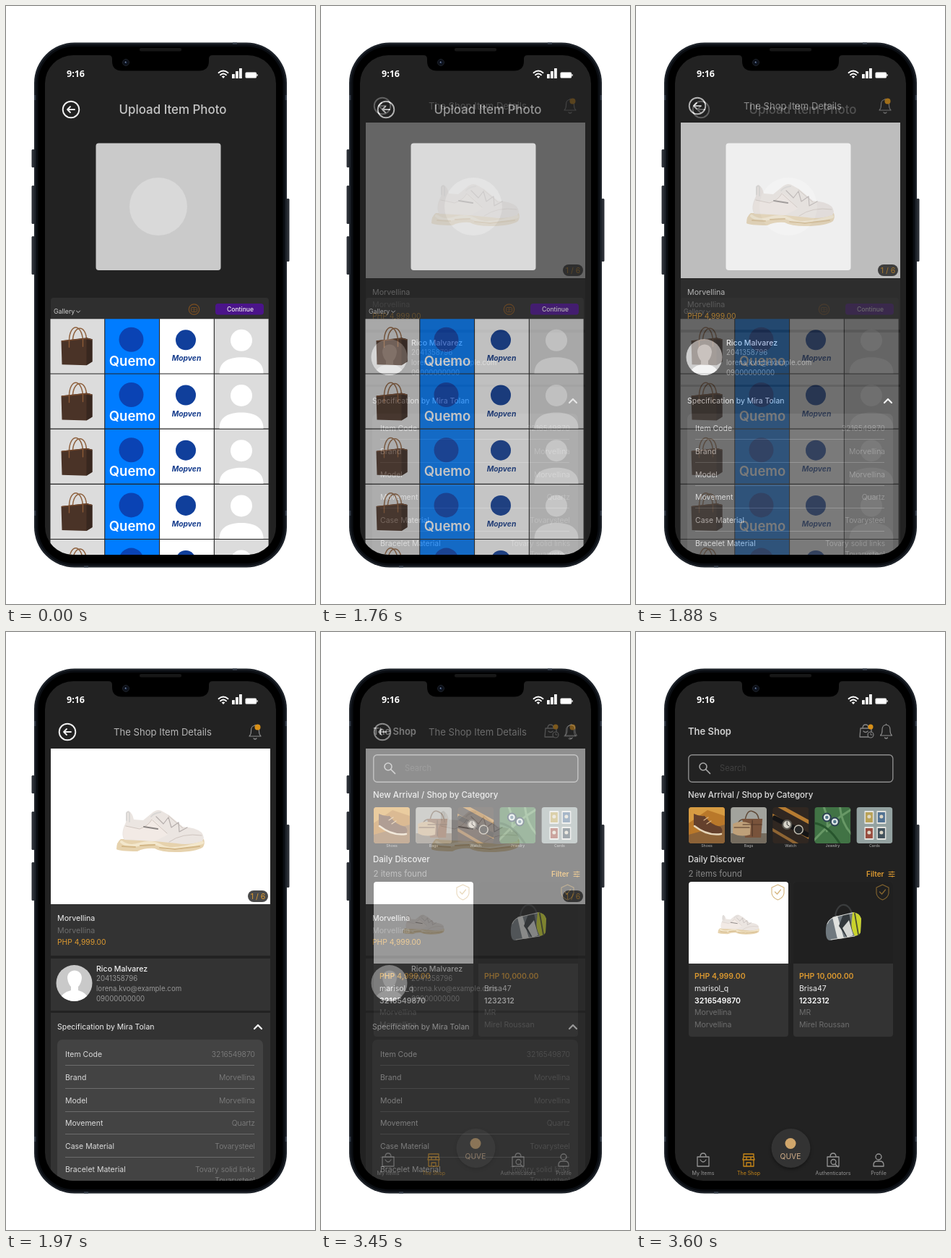
Write an HTML page with a canvas that moves like this. It is 428x826 px and loops after 5.27 s.

```html
<!DOCTYPE html>
<html lang="en">
<head>
<meta charset="utf-8">
<title>Shop app walkthrough</title>
<style>
html, body { margin: 0; width: 100%; height: 100%; overflow: hidden; background: #fff; }
canvas { display: block; width: 428px; height: 826px; }
</style>
</head>
<body>
<canvas id="stage" width="428" height="826"></canvas>
<script>
const W = 428, H = 826, LOOP = 5270, STEP = 30, STEPS = 10;
const BG = '#222222', PANEL = '#333333', GOLD = '#dd9a30', PALE = '#dedede', DIM = '#6e6e6e';
const stage = document.getElementById('stage').getContext('2d');
let g = stage;

function box(x, y, w, h, r, fill, stroke, width = 1) {
  g.beginPath();
  g.roundRect(x, y, w, h, r);
  paint(fill, stroke, width);
}
function disc(x, y, r, fill, stroke, width = 1) {
  g.beginPath();
  g.arc(x, y, r, 0, Math.PI * 2);
  paint(fill, stroke, width);
}
function paint(fill, stroke, width) {
  if (fill) { g.fillStyle = fill; g.fill(); }
  if (stroke) { g.strokeStyle = stroke; g.lineWidth = width; g.stroke(); }
}
function shape(d, fill) {
  g.fillStyle = fill;
  g.fill(new Path2D(d));
}
function line(d, color, width = 1) {
  g.strokeStyle = color;
  g.lineWidth = width;
  g.lineCap = g.lineJoin = 'round';
  g.stroke(new Path2D(d));
}
function text(s, x, y, size, color, weight = 400, align = 'left', family = 'Inter') {
  g.font = `${weight} ${size}px "${family}", sans-serif`;
  g.textAlign = align;
  g.fillStyle = color;
  g.fillText(s, x, y);
}
function at(x, y, scale, draw) {
  g.save();
  g.translate(x, y);
  g.scale(scale, scale);
  draw();
  g.restore();
}
function clipped(x, y, w, h, r, draw) {
  g.save();
  g.beginPath();
  g.roundRect(x, y, w, h, r);
  g.clip();
  draw();
  g.restore();
}

function backButton(x, y) {
  disc(x, y, 11.3, null, '#f2f2f2', 1.9);
  line(`M${x + 5} ${y}h-10m4 -4l-4 4l4 4`, '#f2f2f2', 1.8);
}
function bell(x, y, dot) {
  line(`M${x - 8} ${y + 6}h16c-3 -3 -2.5 -5 -2.5 -8c0 -9 -11 -9 -11 0c0 3 .5 5 -2.5 8zM${x - 2} ${y + 9}q2 2 4 0M${x} ${y - 9}v-1`, '#8c8c8c', 1.2);
  if (dot) disc(x + 3.5, y - 6.5, 4, '#d89018');
}

// Sneaker, 123 units wide
function shoe() {
  shape('M7 43Q1 47 1 57Q5 60 30 60Q40 55 54 56Q62 61 83 61Q111 61 121 54Q124 49 122 43Z', '#e6d2ad');
  shape('M14 20Q14 3 18 4Q23 7 25 16L38 17L49 8Q58 0 65 5L74 10L93 26Q111 27 119 34Q124 41 120 46Q101 52 85 49L54 46L12 44Q6 36 14 20Z', '#ebe5e1');
  shape('M13 25L30 28Q44 26 50 15L58 20L72 37L54 46L12 43Q8 35 13 25Z', '#f2eae5');
  line('M19 19V7q-2 -3 -4 0v10M49 12q4 -5 13 -6', '#d9d7d5', 2);
  line('M14 25l19 4q12 -4 17 -13M51 17l20 18M73 11l20 17M74 47q18 -13 45 -9', '#cfc5bf', 1);
  line('M56 12l10 10l7 -9l4 14l10 -7l1 13l11 -6', '#b5aeac', 1.2);
  line('M39 26l19 3', '#8b8583', 2);
  line('M8 47q10 8 26 3t30 3t56 -5', '#f3e7cc', 4);
  line('M9 53l18 1M34 52l20 -1M61 55l21 2l34 -4', '#d3b787', 2);
}

function handbag() {
  line('M26 29C27 6 43 6 45 29M31 28C33 8 49 8 50 28', '#8f623f', 1.5);
  shape('M15 30L50 26L58 28V59L50 64L16 63Z', '#4a3327');
  shape('M50 26L58 28V59L50 64Z', '#38271f');
  line('M16 30.5L50 27L57 28.5', '#75482c', 1.3);
  line('M26 30v9M45 28v10', '#8b5936', 1.4);
}

function uploadScreen() {
  backButton(90, 143);
  text('Upload Item Photo', 231, 149, 16.9, '#c6c6c6', 500, 'center');
  box(124.5, 189.5, 173, 175.5, 4, '#cacaca');
  disc(211, 277, 40, '#d9d9d9');

  box(62, 403, 302, 30, [4, 4, 0, 0], '#2f2f2f');
  text('Gallery', 66, 425, 8.8, '#d0d0d0');
  line('M97.5 421l2.5 2.5l2.5 -2.5', '#d0d0d0', 1);
  disc(260.5, 419, 7.2, null, '#7d4f20', 1.2);
  box(256.5, 416.5, 8, 6, 1, null, '#7d4f20');
  disc(260.5, 419.5, 1.4, null, '#7d4f20', .8);
  box(290, 411, 67, 15.5, 4, '#4b148a');
  text('Continue', 324.5, 422, 8.6, '#eeeeee', 500, 'center');

  for (let row = 0; row < 5; row++) {
    at(61.5, 432.3 + row * 76.2, 1, () => {
      ['#dcdcdc', '#007cff', '#fff', '#dcdcdc'].forEach((color, i) =>
        box(i * 75.8, 0, 74.7, 75.1, 0, color));
      handbag();
      disc(112, 28.5, 17, '#0a43b4');
      text('Quemo', 113.5, 64.5, 18.5, '#fff', 600, 'center');
      disc(187.5, 29, 14, '#103f9b');
      text('Mopven', 188.5, 58, 10.3, '#163d8d', 'italic 700', 'center');
      disc(264.5, 29.5, 15, '#fff');
      shape('M234 75C234 59 247 53 264.5 53S295 59 295 75Z', '#fff');
    });
  }
}

function detailScreen() {
  backButton(85, 138);
  text('The Shop Item Details', 217, 143, 13.1, '#b5b5b5', 400, 'center');
  bell(345, 138, true);
  box(62, 161, 304, 215, 0, '#fff');
  at(152, 243, 1, shoe);
  box(335, 357, 28, 16, 8, '#4a4a4a');
  text('1 / 6', 349, 369, 10.5, GOLD, 400, 'center');

  box(62, 376.5, 304, 70.5, 0, PANEL);
  text('Morvellina', 71, 399, 10.7, '#f2f2f2');
  text('Morvellina', 71, 416, 10.7, DIM);
  text('PHP 4,999.00', 71, 432, 10.3, GOLD);

  box(62, 451, 304, 72, 0, PANEL);
  clipped(69.5, 460, 50, 50, 25, () => {
    box(69, 460, 51, 51, 0, '#c9c9c9');
    shape('M85 478C85 464 105 464 105 478Q104 486 100 490V495Q113 498 116 511H73Q76 498 90 495V490Q86 486 85 478Z', '#fff');
  });
  text('Rico Malvarez', 125, 469, 10.6, '#f2f2f2', 500);
  ['2041358796', 'lorena.kvo@example.com', '09000000000'].forEach((s, i) =>
    text(s, 125, 482.3 + i * 13.8, 9.7, '#969696'));

  box(62, 526, 304, 240, 0, PANEL);
  text('Specification by Mira Tolan', 71, 549, 10.5, '#eeeeee');
  line('M344 548l5 -5l5 5', '#fff', 2.2);
  box(71, 563, 285, 220, 7, '#434343');
  const specs = [['Item Code', '3216549870'], ['Brand', 'Morvellina'], ['Model', 'Morvellina'],
    ['Movement', 'Quartz'], ['Case Material', 'Tovarysteel'], ['Bracelet Material', 'Tovary solid links']];
  specs.forEach(([label, value], i) => {
    const y = 587 + i * 31.8;
    text(label, 82, y, 10.5, '#dadada');
    text(value, 345, y, 10.4, '#858585', 300, 'right');
    if (i < 5) box(82, Math.round(y + 11), 262, 1, 0, '#6c6c6c');
  });
  text('Tovarysteel', 345, 761, 10.4, '#858585', 300, 'right');
}

function duffel() {
  line('M14 17C16 -4 34 -4 37 14', '#3a3c3d', 2.2);
  shape('M1 33Q2 21 12 18L38 11Q48 12 50 20L49 39Q48 43 41 44L6 50Q0 49 1 33Z', '#6f787e');
  shape('M38 11Q48 12 50 20L49 39Q47 43 41 44L36 32Z', '#c9d32c');
  shape('M10 18L17 16L26 47L17 48Z', '#dfe1de');
  shape('M25 14L33 12L39 44L30 46L19 30Z', '#33393d');
  shape('M24 33L33 22L39 43L31 46Z', '#d5d7d4');
  line('M3 27q3 -8 13 -10l22 -5M8 49l33 -5', '#d8d8d4', 1);
  line('M41 13l5 29', '#4a5030', 1.8);
}

const thumbs = [
  ['Shoes', '#b9782a', () => {
    shape('M0 0H50V12L26 4L0 22Z', '#d69b42');
    shape('M0 38L50 24V50H0Z', '#8c6237');
    shape('M7 9Q15 13 22 12Q31 25 44 27Q49 33 44 37Q26 40 7 25Z', '#64402c');
    line('M8 26q18 14 37 11', '#e6d5b9', 2.5);
    line('M21 18l6 -4M25 23l6 -4', '#d9b588', 1.2);
  }],
  ['Bags', '#a2a39d', () => {
    shape('M0 36H50V50H0Z', '#756c5f');
    line('M20 18Q23 2 31 6Q40 9 39 22M9 24Q16 10 25 24', '#604b39', 1.5);
    shape('M16 16H44L42 42H20Z', '#79533b');
    shape('M3 23Q14 17 28 23L27 38Q13 42 3 36Z', '#bfa079');
    line('M17 24h26M5 28h21M30 18v22', '#503727', 1.2);
  }],
  ['Watch', '#302721', () => {
    line('M-3 10L53 43M5 -4L53 22', '#b57b31', 5);
    line('M-2 30L39 54', '#8f6533', 4);
    line('M3 15L48 38', '#151516', 7);
    disc(20, 24, 6, '#d5d3c9', '#5d5b55', 2);
    disc(36, 31, 6, '#262728', '#c1bdb0', 1.5);
    line('M20 20v4l3 2', '#333', 1);
  }],
  ['Jewelry', '#417345', () => {
    line('M-2 47Q22 20 51 3M13 0Q20 18 17 33M35 -2Q37 22 51 37', '#689866', 3);
    line('M0 22Q20 25 36 52', '#28562e', 3);
    for (const [x, y] of [[17, 14], [28, 20]]) {
      disc(x, y, 5.5, '#dce5e4', '#2a4050', 2);
      disc(x, y, 2.2, '#527689');
    }
  }],
  ['Cards', '#94a2a1', () => {
    ['#b9a257', '#527292', '#984c3f', '#42515b'].forEach((color, i) => {
      const x = 11 + i % 2 * 17, y = 5 + (i >> 1) * 22;
      box(x, y, 13, 18, 1, '#e2e2de');
      box(x + 1.5, y + 2, 10, 14, 0, color);
      disc(x + 6.5, y + 8, 2.5, '#ddd7c7');
    });
  }]
];

function shield(x, y) {
  const color = 'rgba(190,140,55,.65)';
  line(`M${x} ${y - 10}l8.5 4v8q-1 6 -8.5 9q-7.5 -3 -8.5 -9v-8z`, color, 1.1);
  line(`M${x - 4} ${y}l3 3l5 -6`, color, 1.3);
}

function productCard(x, photo, lines, drawItem) {
  box(x, 345, 138, 214, 4, PANEL);
  box(x, 345, 138, 113, [4, 4, 0, 0], photo);
  drawItem();
  shield(x + 123.5, 359);
  const styles = [[479, GOLD, 600], [496, '#eeeeee', 400], [513, '#ffffff', 600], [529, DIM, 400], [546, DIM, 400]];
  styles.forEach(([y, color, weight], i) => text(lines[i], x + 8, y, 10.5, color, weight));
}

const navIcons = [
  ['My Items', 93, 'M-8 -5H8V8H-8ZM-4 -5Q-4 -10 0 -10Q4 -10 4 -5M-4 -1Q0 5 4 -1'],
  ['The Shop', 156, 'M-7 -9H7V-5H-7ZM-7 -5L-8 -1H8L7 -5M-7 0V8H7V0M-3 8V3H3V8M-3 -5V-1M3 -5V-1'],
  ['Authenticators', 273, 'M-8 -5H8V8H-8ZM-4 -5Q-4 -10 0 -10Q4 -10 4 -5M4 2A3.5 3.5 0 1 1 -3 2A3.5 3.5 0 1 1 4 2M3 5L7 9'],
  ['Profile', 336, 'M4 -5A4 4 0 1 1 -4 -5A4 4 0 1 1 4 -5M-7 8V6Q-7 1 -2 1H2Q7 1 7 6V8Z']
];

function shopScreen() {
  text('The Shop', 72, 142, 13, '#d0d0d0', 600);
  line('M311 133h15v12h-16zM314 133q0 -5 4 -5t4 5M315 137q3 3 6 0', '#858585', 1.3);
  disc(325, 142, 4, BG, '#858585', 1.2);
  line('M325 140v2h2', '#858585', 1);
  disc(325, 131, 3.5, '#d89018');
  bell(346.5, 137);

  box(72.8, 169.8, 283, 37.5, 5, null, '#8c8c8c', 1.4);
  disc(93, 186, 5, null, '#a8a8a8', 1.6);
  line('M97 190l5.5 5.5', '#a8a8a8', 1.7);
  text('Search', 116, 192, 11.2, '#404040');
  text('New Arrival / Shop by Category', 72, 229, 11.5, PALE, 500);
  thumbs.forEach(([label, color, draw], i) => {
    const x = 73 + i * 58.1;
    at(x, 242, 1, () => clipped(0, 0, 50, 50, 4, () => {
      box(0, 0, 50, 50, 0, color);
      draw();
    }));
    text(label, x + 25, 297, 5.3, '#b5b5b5', 400, 'center');
  });

  text('Daily Discover', 72, 318, 11.5, PALE, 500);
  text('2 items found', 72.5, 338, 11.5, '#888888');
  text('Filter', 319, 337.5, 10, GOLD, 600);
  line('M350 331.5h8M350 334.5h8M350 337.5h8M355 330.5v2M352 333.5v2M355 336.5v2', GOLD, .9);
  productCard(73, '#fff', ['PHP 4,999.00', 'marisol_q', '3216549870', 'Morvellina', 'Morvellina'],
    () => at(113, 389, .47, shoe));
  productCard(218, '#202020', ['PHP 10,000.00', 'Brisa47', '1232312', 'MR', 'Mirel Roussan'],
    () => at(262, 376, 1, duffel));

  g.save();
  g.shadowColor = 'rgba(0,0,0,.4)';
  g.shadowBlur = 4;
  g.shadowOffsetY = 2;
  disc(214.5, 713, 27, PANEL);
  g.restore();
  disc(214, 706.5, 7.5, '#d0a66b');
  text('QUVE', 214, 727.5, 10.3, '#d3b08a', 400, 'center');
  navIcons.forEach(([label, x, d], i) => {
    const color = i === 1 ? '#c98818' : '#969696';
    at(x, 730, 1, () => line(d, color, 1.3));
    text(label, x, 750, 7.1, color, 400, 'center');
  });
}

function phone() {
  const rim = '#1d2229', band = '#353d48';
  for (const [y, h] of [[198, 25], [248, 53], [318, 53]]) box(35.5, y, 4, h, 1.5, '#2a2e35');
  box(388.5, 266, 4, 87, 1.5, '#2a2e35');
  box(39, 50.5, 350, 725, 56, rim);
  for (const y of [123, 697]) for (const x of [39, 385.5]) box(x, y, 3.5, 7, 0, band);
  box(314, 50.5, 6, 3, 0, band);
  box(108, 772, 6, 3.5, 0, band);
  box(41.5, 53, 345, 720, 53.5, '#0a0d12');
  box(44.5, 56, 339, 714, 50, '#000');
  box(54, 68, 320, 690, 39, BG);
}
function phoneFront() {
  shape('M142 68Q147 68 147 73V76Q147 89.5 161 89.5H267Q281 89.5 281 76V73Q281 68 286 68Z', '#000');
  box(185, 58, 58, 4.5, 2, '#171717');
  disc(166, 78, 4.5, '#0c1019', '#20242c', .9);
  disc(166, 78, 1.6, '#203250');
  disc(165.5, 77.5, .7, '#a5adbd');
  text('9:16', 84, 98, 12.5, '#fff', 700, 'left', 'Open Sans');
  line('M294.5 92.2Q301 86.8 307.5 92.2M297 95.2Q301 92 305 95.2', '#fff', 1.9);
  shape('M298.7 97.3Q301 95.5 303.3 97.3L301 100Z', '#fff');
  for (let i = 0; i < 3; i++) box(313 + i * 5, 94 - i * 4, 3.8, 6 + i * 4, .5, '#fff');
  box(331.5, 91.5, 15.5, 8, 1.5, '#fff');
  box(347.4, 94, 1.2, 3, .5, '#fff');
}

function layer(draw) {
  const canvas = document.createElement('canvas');
  canvas.width = W;
  canvas.height = H;
  g = canvas.getContext('2d');
  g.fillStyle = '#fff';
  g.fillRect(0, 0, W, H);
  phone();
  clipped(54, 68, 320, 690, 39, draw);
  phoneFront();
  return canvas;
}

const [upload, detail, shop] = [uploadScreen, detailScreen, shopScreen].map(layer);
const fade = (t, start) => Math.max(0, Math.min(STEPS, Math.floor((t - start) / STEP) + 1)) / STEPS;

function render(now) {
  const t = now % LOOP;
  const second = fade(t, 3330);
  const [from, to, mix] = second ? [detail, shop, second] : [upload, detail, fade(t, 1700)];
  stage.globalAlpha = 1;
  stage.drawImage(from, 0, 0);
  stage.globalAlpha = mix;
  stage.drawImage(to, 0, 0);
}

const began = performance.now();
function tick() {
  render(performance.now() - began);
  requestAnimationFrame(tick);
}
tick();
</script>
</body>
</html>
```
